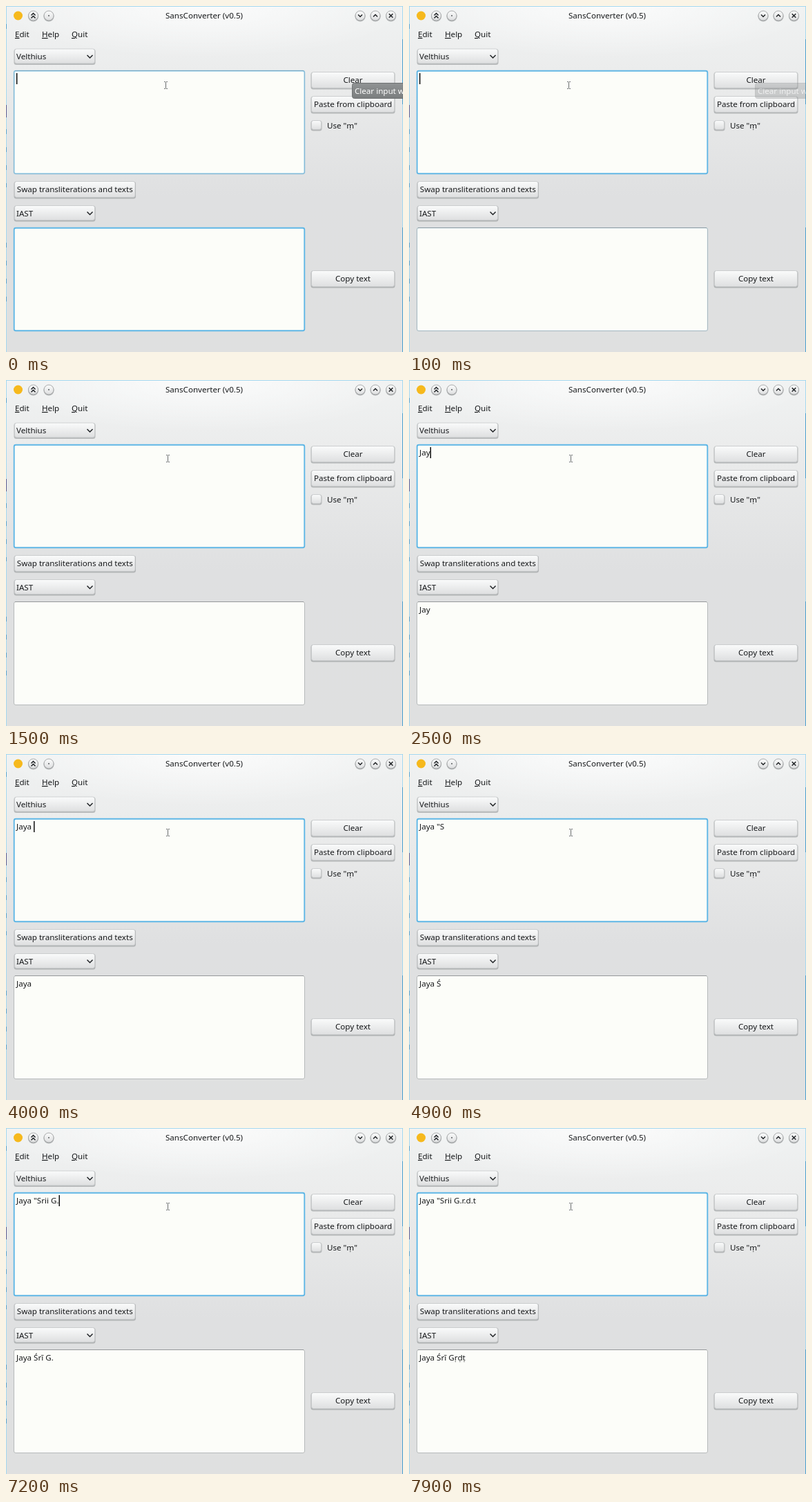
An HTML page that plays this animation: 575x500 px, repeating every 8 s.

```html
<!DOCTYPE html>
<html lang="en">
<head>
<meta charset="utf-8">
<title>SansConverter</title>
<style>
  html, body { margin: 0; width: 100%; height: 100%; overflow: hidden; background: #dfe0e0; }
  svg { display: block; width: 575px; height: 500px; }
  text { font: 11.6px "Noto Sans", sans-serif; fill: #17191b; white-space: pre; }
  .middle { text-anchor: middle; }
  .line { fill: none; stroke: #202326; stroke-width: 1.5; }
  u, .key { text-decoration: underline; }
</style>
</head>
<body>
<svg viewBox="0 0 575 500">
  <defs>
    <linearGradient id="window" x2="0" y2="1">
      <stop offset="0" stop-color="#f0f2f2"/>
      <stop offset=".2" stop-color="#ebecec"/>
      <stop offset=".55" stop-color="#dfe0e1"/>
      <stop offset="1" stop-color="#dfe0e0"/>
    </linearGradient>
    <radialGradient id="shine" gradientUnits="userSpaceOnUse" cx="0" cy="0" r="1"
        gradientTransform="translate(287 0) scale(300 75)">
      <stop offset="0" stop-color="#fff" stop-opacity=".75"/>
      <stop offset="1" stop-color="#fff" stop-opacity="0"/>
    </radialGradient>
    <linearGradient id="button" x2="0" y2="1">
      <stop offset="0" stop-color="#fafbfb"/>
      <stop offset="1" stop-color="#dedfe0"/>
    </linearGradient>
    <linearGradient id="tip" x2="0" y2="1">
      <stop offset="0" stop-color="#8d9091"/>
      <stop offset="1" stop-color="#777a7b"/>
    </linearGradient>
  </defs>

  <rect width="575" height="500" fill="url(#window)"/>
  <rect width="575" height="80" fill="url(#shine)"/>
  <path d="M0 .5H575M.5 0V500M574.5 0V500" stroke="#a5d8ef"/>
  <path d="M574.5 48V142M574.5 320V500" stroke="#4a9fce"/>
  <path d="M.5 143V161" stroke="#5d5f94"/>
  <path d="M.5 26V44M.5 178V262M.5 342V434" stroke="#5aa5d0" stroke-dasharray="7 19"/>

  <circle cx="17.5" cy="14" r="6.5" fill="#f6b91d"/>
  <text class="middle" x="287" y="18">SansConverter (v0.5)</text>
  <text x="13" y="45"><tspan class="key">E</tspan>dit</text>
  <text x="52" y="45"><tspan class="key">H</tspan>elp</text>
  <text x="95" y="45"><tspan class="key">Q</tspan>uit</text>

  <g id="widgets"></g>
  <text x="465" y="177">Use "ṃ"</text>

  <text id="input" x="15" y="109"></text>
  <text id="output" x="15" y="336"></text>
  <rect id="caret" y="97" width="1.4" height="16" fill="#000"/>
  <path id="pointer" d="M-2.5 -5H-.8L0 -4.2L.8 -5H2.5M0 -4.2V4.2M-2.5 5H-.8L0 4.2L.8 5H2.5"
      fill="none" stroke="#686c6e"/>

  <g id="tooltip">
    <rect x="501.5" y="111.5" width="130" height="22" rx="3" fill="url(#tip)" stroke="#6b6e6f"/>
    <text x="505" y="127" style="fill:#fff">Clear input window</text>
  </g>
</svg>
<script>
const LOOP = 8000;
const $ = id => document.getElementById(id);
const add = markup => $('widgets').insertAdjacentHTML('beforeend', markup);

const box = (x, y, w, h) => `
  <rect x="${x - .5}" y="${y + .5}" width="${w + 1}" height="${h + 1}" rx="3.5" fill="#8b8e90" opacity=".55"/>
  <rect x="${x + .5}" y="${y + .5}" width="${w - 1}" height="${h - 1}" rx="3" fill="url(#button)" stroke="#c6c8c9" stroke-width=".8"/>`;

function pushButton(x, y, w, h, label) {
  add(`${box(x, y, w, h)}<text class="middle" x="${x + w / 2}" y="${y + h / 2 + 4}">${label}</text>`);
}

function comboBox(y, label) {
  add(`${box(12, y, 117, 22)}<text x="15" y="${y + 15.5}">${label}</text>
    <path class="line" d="M117.5 ${y + 9.5}l4 4l4 -4"/>`);
}

function textArea(y, glowId) {
  add(`<rect x="11.5" y="${y + .5}" width="421" height="149" rx="2.5" fill="#fcfdf9" stroke="#b7babb"/>
    <path d="M13 ${y + .5}H431" stroke="#95989a"/>
    <rect id="${glowId}" x="11.7" y="${y + .7}" width="420.6" height="148.6" rx="2.5"
      fill="none" stroke="#5fb7e6" stroke-width="1.9"/>`);
}

function titleButton(x, icon) {
  add(`<circle cx="${x}" cy="14.8" r="7.6" fill="#85888a" opacity=".6"/>
    <circle cx="${x}" cy="14" r="7" fill="url(#button)" stroke="#9b9d9f" stroke-width=".8"/>
    <path class="line" transform="translate(${x} 14)" d="${icon}"/>`);
}

titleButton(39.5, 'M-3 -.5l3 -3l3 3M-3 3.5l3 -3l3 3');
titleButton(62, 'M-.7 0h1.4');
titleButton(513, 'M-3 -1.5l3 3l3 -3');
titleButton(535, 'M-3 1.5l3 -3l3 3');
titleButton(557.5, 'M-2.8 -2.8l5.6 5.6M2.8 -2.8l-5.6 5.6');

comboBox(61.5, 'Velthius');
comboBox(288, 'IAST');
textArea(93, 'inputGlow');
textArea(320, 'outputGlow');
pushButton(442, 95, 121, 24, 'Clear');
pushButton(442, 130, 121, 24, 'Paste from clipboard');
pushButton(442, 382, 121, 24, 'Copy text');
pushButton(12, 253, 175.5, 24, 'Swap transliterations and texts');
add(box(442, 165, 15, 14));

// Typed text and caret visibility from each moment on
const typing = [
  [0, '', 1], [500, '', 0], [900, '', 1], [1500, '', 0], [1900, '', 1],
  [2200, 'J', 1], [2400, 'Ja', 1], [2500, 'Jay', 1], [2600, 'Jaya', 1],
  [3000, 'Jaya', 0], [3100, 'Jaya ', 1], [3500, 'Jaya ', 0],
  [3900, 'Jaya', 1], [4000, 'Jaya ', 1], [4400, 'Jaya "', 1], [4500, 'Jaya "', 0],
  [4900, 'Jaya "S', 0], [5500, 'Jaya "S', 1], [5600, 'Jaya "Sr', 1],
  [5800, 'Jaya "Sri', 0], [5900, 'Jaya "Srii', 0],
  [6300, 'Jaya "Srii ', 1], [6500, 'Jaya "Srii ', 0],
  [6900, 'Jaya "Srii G', 0], [7200, 'Jaya "Srii G.', 1], [7300, 'Jaya "Srii G.r', 1],
  [7500, 'Jaya "Srii G.r.', 1], [7600, 'Jaya "Srii G.r.d', 1],
  [7700, 'Jaya "Srii G.r.d.', 1], [7900, 'Jaya "Srii G.r.d.t', 0]
];

// Tooltip, input glow and output glow opacities while focus changes
const focus = [[0, .96, .55, 1], [100, .3, .96, .12], [200, 0, 1, 0]];

const latest = (steps, t) => steps.findLast(step => step[0] <= t);

const toIAST = text => text
  .replace('"S', 'Ś')
  .replace('ii', 'ī')
  .replace(/\.([a-z])/g, '$1\u0323')
  .normalize('NFC');

function draw(t) {
  const [, text, caretOn] = latest(typing, t);
  $('input').textContent = text;
  $('output').textContent = toIAST(text);
  $('caret').setAttribute('x', 15 + (text ? $('input').getComputedTextLength() : 0));
  $('caret').setAttribute('opacity', caretOn);

  const [, ...opacities] = latest(focus, t);
  ['tooltip', 'inputGlow', 'outputGlow'].forEach((id, i) =>
    $(id).setAttribute('opacity', opacities[i]));

  const pointer = t < 300 ? '231.5 114.5' : '234.5 113.5';
  $('pointer').setAttribute('transform', `translate(${pointer})`);
}

function tick() {
  draw(performance.now() % LOOP);
  requestAnimationFrame(tick);
}
tick();
</script>
</body>
</html>
```
